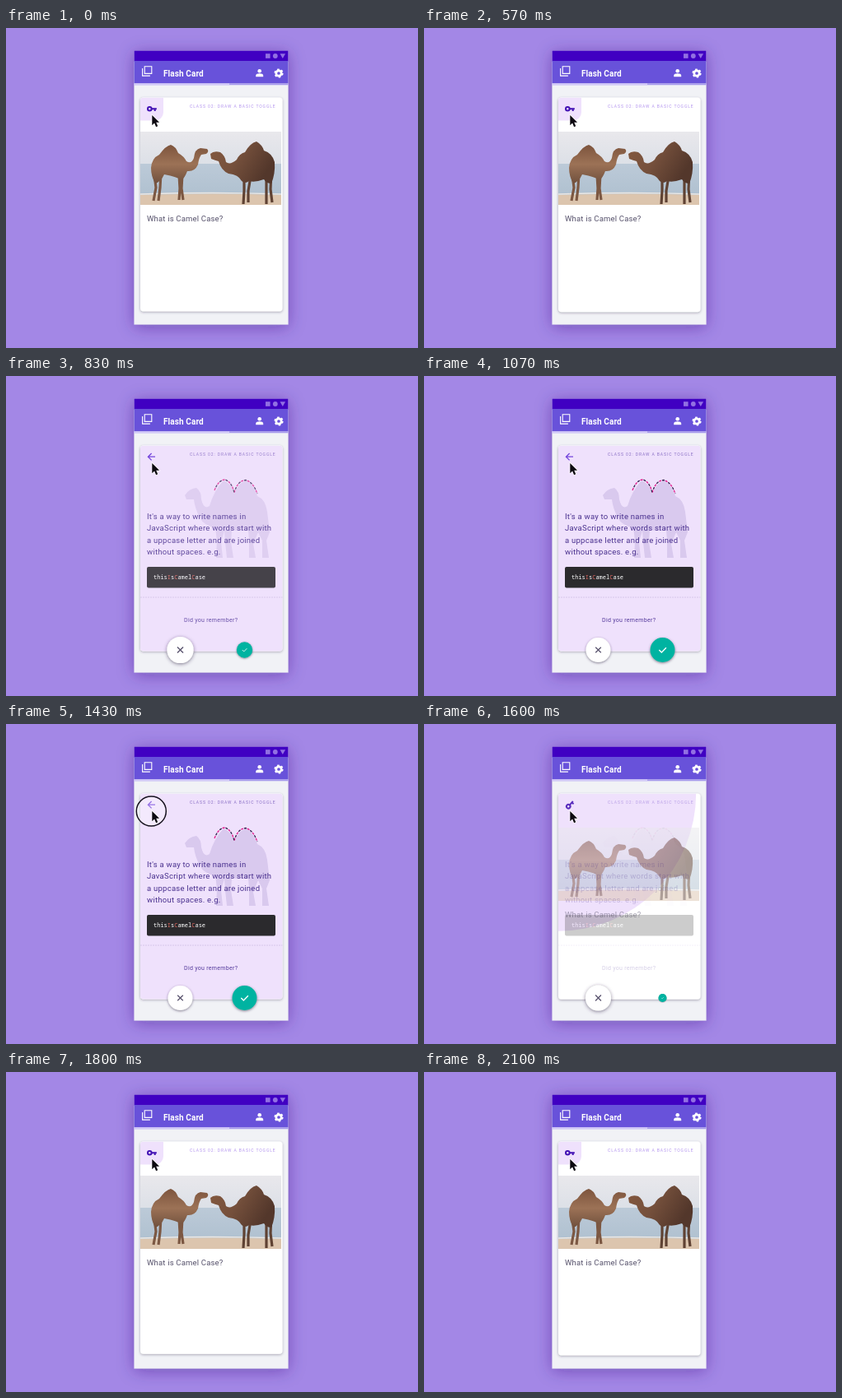
Recreate the animation shown at these times as an HTML page. Size 500 by 389 pixels, loop 2.13 s.

```html
<!DOCTYPE html>
<html lang="en">
<head>
<meta charset="utf-8">
<title>Flash card</title>
<style>
html, body { margin: 0; height: 100%; overflow: hidden; background: #a387e6; }
svg { display: block; width: 100vw; height: 100vh; }
text { font-family: Roboto, Arial, sans-serif; }
.class { font-size: 5px; letter-spacing: .92px; }
.body { font-size: 9.5px; letter-spacing: .25px; }
.code { font: 500 7px "Noto Sans Mono", "DejaVu Sans Mono", monospace; }
.line { fill: none; stroke-width: 1.3; }
.legs { fill: none; stroke-width: 3.2; stroke-linejoin: round; }
</style>
</head>
<body>
<svg viewBox="0 0 500 389">
  <defs>
    <filter id="deviceShadow" x="-30%" y="-30%" width="160%" height="160%">
      <feDropShadow dx="0" dy="3" stdDeviation="10" flood-color="#3a1c80" flood-opacity=".45"/>
    </filter>
    <filter id="shadow" x="-30%" y="-30%" width="160%" height="160%">
      <feDropShadow dx="0" dy="1" stdDeviation="1.4" flood-color="#30254a" flood-opacity=".4"/>
    </filter>
    <filter id="buttonShadow" x="-30%" y="-30%" width="160%" height="160%">
      <feDropShadow dx="0" dy="1" stdDeviation="1.8" flood-color="#30254a" flood-opacity=".6"/>
    </filter>
    <linearGradient id="sky" x2="0" y2="1">
      <stop stop-color="#e9e8ec"/><stop offset="1" stop-color="#dce0e7"/>
    </linearGradient>
    <linearGradient id="sea" x2="0" y2="1">
      <stop stop-color="#bccad8"/><stop offset="1" stop-color="#b0c1d0"/>
    </linearGradient>
    <linearGradient id="fur" x2="0" y2="1">
      <stop stop-color="#7d543d"/><stop offset=".5" stop-color="#9c7256"/><stop offset="1" stop-color="#70503d"/>
    </linearGradient>
    <linearGradient id="darkFur" x2="1" y2=".4">
      <stop stop-color="#85593f"/><stop offset=".5" stop-color="#75503c"/><stop offset="1" stop-color="#53372b"/>
    </linearGradient>
    <clipPath id="cardClip"><rect class="card" x="163" y="84.5" width="172.5" height="261" rx="4"/></clipPath>
  </defs>

  <!-- Device and app bar -->
  <rect width="500" height="389" fill="#a387e6"/>
  <rect x="155.5" y="27.5" width="187" height="333" fill="#f1f2f6" filter="url(#deviceShadow)"/>
  <rect x="155.5" y="27.5" width="187" height="13" fill="#4000c2"/>
  <rect x="155.5" y="40" width="187" height="27.3" fill="#6852da"/>
  <rect x="155.5" y="67.3" width="187" height="2" fill="#a498eb"/>
  <rect x="155.5" y="67.3" width="115.5" height="2" fill="#d3caf8"/>
  <g fill="#9270e2">
    <rect x="315" y="31.2" width="5.6" height="5.6"/>
    <circle cx="326.8" cy="34" r="2.9"/>
    <path d="M332.5 31.2h6.6l-3.3 5.8z"/>
  </g>
  <path fill="none" stroke="#fff" stroke-width="1.1" d="M168.2 46.8h8.6v8.6h-8.6zM165.6 49v9.1h9.3"/>
  <text x="191" y="59" fill="#fff" font-size="10" font-weight="700" letter-spacing=".1">Flash Card</text>
  <circle cx="307.7" cy="52.3" r="2.3" fill="#fff"/>
  <path fill="#fff" d="M303.2 59.2v-1.5c0-3.2 9-3.2 9 0v1.5z"/>
  <g fill="none" stroke="#fff">
    <circle cx="331" cy="55" r="3.2" stroke-width="2.7"/>
    <circle cx="331" cy="55" r="4.6" stroke-width="2" stroke-dasharray="2.41"/>
  </g>

  <!-- Card -->
  <rect class="card" x="163" y="84.5" width="172.5" height="261" rx="4" fill="#fff" filter="url(#shadow)"/>
  <g clip-path="url(#cardClip)">
    <path id="reveal" fill="#efe1fc"/>
    <g id="front">
      <text class="class" x="223" y="97" fill="#b394ee">CLASS 02: DRAW A BASIC TOGGLE</text>
      <rect x="163" y="126" width="171" height="40" fill="url(#sky)"/>
      <rect x="163" y="165" width="171" height="38" fill="url(#sea)"/>
      <path d="M163 203q90-3 171 0v12h-171z" fill="#dcc5ae"/>
      <path d="M163 202q90-3 171 0" fill="none" stroke="#ece8e4" stroke-width="1.5"/>
      <path class="legs" stroke="#7c5843" d="M180 178L182 194 179 210M188 176L187 194 185 210M210 178L211 195 210 209M214 178L213 195 215 209"/>
      <path fill="url(#fur)" d="M176 170Q177 158 186 154Q194 143 200 142Q206 144 209 152Q216 156 219 162Q225 166 228 158Q229 147 236 146L244 147Q247 150 243 153L237 154Q234 158 233 166Q229 175 220 174Q217 182 213 185Q208 181 192 178Q188 187 181 189Q176 180 176 170Z"/>
      <path class="legs" stroke="#5f4233" d="M289 178L289 198 288 214M297 180L294 198 294 212M316 176L316 198 316 214M322 174L321 196 323 212"/>
      <path fill="url(#darkFur)" d="M248 153Q252 149 260 151Q266 155 267 163Q272 167 280 160Q283 153 290 151Q296 140 304 138Q311 142 313 149Q323 152 326 163Q327 177 322 189Q316 189 313 184Q302 188 295 186Q290 190 286 186Q282 178 270 177Q261 173 258 162Q254 161 249 159Z"/>
      <text x="171" y="234.5" fill="#55506a" font-size="9.5" letter-spacing=".18">What is Camel Case?</text>
    </g>
    <g id="back">
      <text class="class" x="223" y="97" fill="#8b70c6">CLASS 02: DRAW A BASIC TOGGLE</text>
      <g id="drawing">
        <path fill="#d9c9ee" d="M217 145Q222 137 231 136Q237 140 237 150Q240 163 247 158Q252 140 264 127Q273 130 277 143Q283 128 292 127Q302 134 305 146Q315 150 317 165L320 190 316 200 319 221 311 221 311 200 306 190 300 204 303 221 295 221 295 200 294 187Q284 189 274 187L273 202 276 221 268 221 266 202 265 188 261 202 263 221 255 221 256 200 254 184Q240 182 235 172Q229 160 228 150L219 150Z"/>
        <path id="humps" class="line" stroke="#e21b8c" stroke-dasharray="3 5" d="M253 139Q258 126 266 126Q274 129 277 142Q281 127 291 126.5Q300 129 305 143"/>
        <path class="line" stroke="#32204e" stroke-dasharray="3 5" stroke-dashoffset="-4" d="M253 139Q258 126 266 126Q274 129 277 142Q281 127 291 126.5Q300 129 305 143"/>
      </g>
      <g class="body" fill="#49308e">
        <text x="171" y="173.5">It's a way to write names in</text>
        <text x="171" y="188">JavaScript where words start with</text>
        <text x="171" y="202.5">a uppcase letter and are joined</text>
        <text x="171" y="217">without spaces. e.g.</text>
      </g>
      <rect x="171" y="232" width="156" height="25.5" rx="2" fill="#2b2a2d"/>
      <text class="code" x="179" y="246.8" fill="#fff">this<tspan fill="#e3685f">I</tspan>s<tspan fill="#e3685f">C</tspan>amel<tspan fill="#e3685f">C</tspan>ase</text>
      <path d="M163 269h173" stroke="#d6c6ea" stroke-dasharray="2 1"/>
      <text x="216" y="298.5" fill="#553a9c" font-size="7" letter-spacing=".3">Did you remember?</text>
    </g>
  </g>

  <g id="key" fill="none" stroke="#4312b4" stroke-width="2">
    <circle cx="174.3" cy="98.2" r="2.3"/>
    <path d="M176.5 98.2h6.3M180.7 98v3"/>
  </g>
  <path id="arrow" class="line" stroke="#7546dc" d="M181 98.2h-8.6M176.6 94l-4.2 4.2 4.2 4.2"/>

  <g id="no">
    <circle r="15" fill="#fff" filter="url(#buttonShadow)"/>
    <path class="line" stroke="#5c5670" d="M-3.3-3.3l6.6 6.6M3.3-3.3l-6.6 6.6"/>
  </g>
  <g id="yes">
    <circle r="15" fill="#00b3a1" filter="url(#buttonShadow)"/>
    <path class="line" stroke="#fff" d="M-4.2 0l3 3 5.6-5.8"/>
  </g>

  <circle id="ring" cx="176.3" cy="106" fill="#fff" fill-opacity=".25" stroke="#17131f" stroke-width="1.5"/>
  <path d="M177.3 106v12.2l2.8-2.6 2 4.6 2.1-1-2-4.4h3.9z" fill="#0c0910" stroke="#fff" stroke-width="1.2" paint-order="stroke"/>
</svg>
<script>
const LOOP = 2130, OPEN = 590, CLOSE = 1525;
const $ = id => document.getElementById(id);
const set = (el, attrs) => { for (const k in attrs) el.setAttribute(k, attrs[k]); };
const ramp = (t, start, length) => Math.min(1, Math.max(0, (t - start) / length));
const smooth = x => x * x * (3 - 2 * x);
const overshoot = x => 1 + 2.7 * (x - 1) ** 3 + 1.7 * (x - 1) ** 2;
const cards = document.querySelectorAll('.card');

function button(id, x, t, show, hide) {
  const scale = overshoot(t < hide ? ramp(t, show, 260) : 1 - ramp(t, hide, 150));
  set($(id), { transform: `translate(${x} 333) scale(${Math.max(0, scale)})` });
}

function cardHeight(t) {
  if (t >= OPEN && t < CLOSE + 75) return 261.5 - 11.5 * smooth(ramp(t, OPEN, 200));
  const since = (t - CLOSE - 75 + LOOP) % LOOP;
  return 261.5 - 11.5 / (1 + since / 80);
}

function draw(t) {
  const turn = smooth(ramp(t, OPEN, 170)) - smooth(ramp(t, CLOSE, 150));
  const size = 28 + 284 * turn, corner = Math.min(size, 10 + 600 * turn);
  const edge = size - corner;
  set($('reveal'), { d: `M163 84.5h${size}v${edge}a${corner} ${corner} 0 0 1 ${-corner} ${corner}h${-edge}z` });
  cards.forEach(card => set(card, { height: cardHeight(t) }));

  const shown = t < CLOSE ? ramp(t, 640, 220) : 1 - ramp(t, CLOSE, 100);
  set($('front'), { opacity: 1 - turn });
  set($('back'), { opacity: shown });
  set($('drawing'), { opacity: shown });
  set($('key'), { opacity: Math.min(1, 1.7 * (1 - turn)), transform: `rotate(${-100 * turn} 177 98.2)` });
  set($('arrow'), { opacity: Math.max(0, 2 * turn - 1), transform: `rotate(${100 * (1 - turn)} 177 98.2)` });

  button('no', 211.5, t, 710, 1575);
  button('yes', 289.5, t, 785, 1463);

  const press = t - (t < 1000 ? 445 : 1385);
  set($('ring'), { r: 14 + 4 * ramp(press, 0, 40), opacity: press >= 0 && press < 115 ? 1 : 0 });
}

function tick() {
  draw(performance.now() % LOOP);
  requestAnimationFrame(tick);
}
tick();
</script>
</body>
</html>
```
